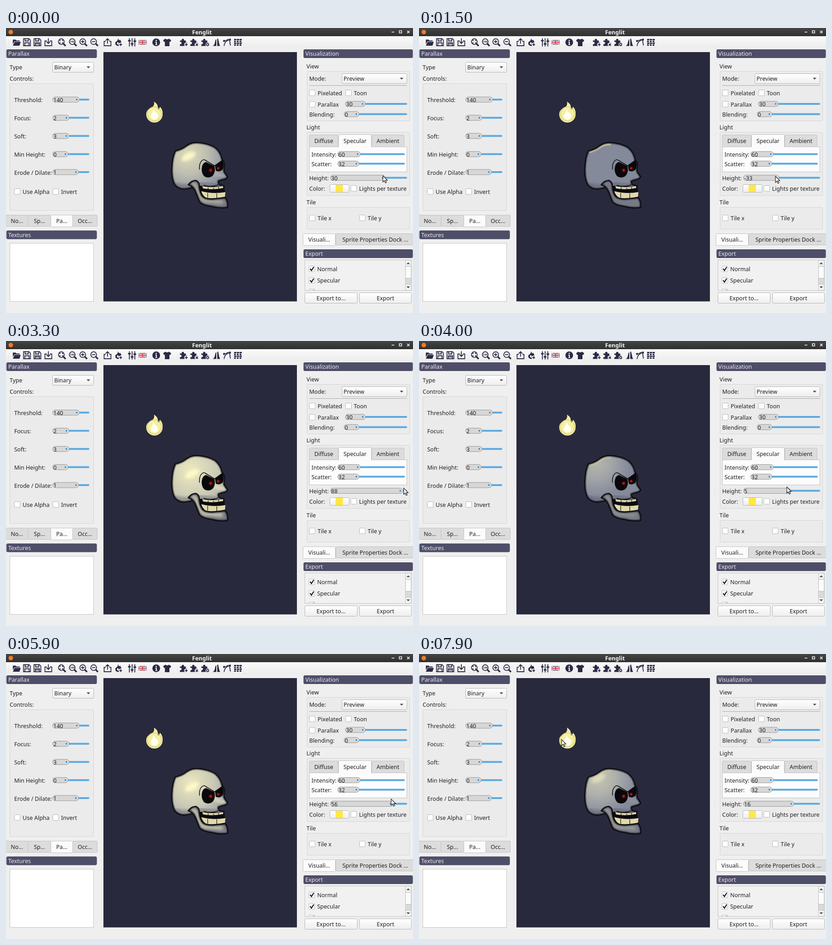
An HTML page that plays this animation: 894x627 px, repeating every 8 s.

```html
<!DOCTYPE html>
<html lang="en">
<head>
<meta charset="utf-8">
<title>Sprite lighting</title>
<style>
html, body { margin: 0; width: 100%; height: 100%; overflow: hidden; background: #efefef; }
svg { display: block; width: 894px; height: 627px; }
text { font: 12.5px "Noto Sans", sans-serif; fill: #1f1f22; white-space: pre; }
.head { fill: #ececf0; }
.mid { text-anchor: middle; }
.title { font-weight: 700; fill: #f4f4f4; text-anchor: middle; }
.solid { fill: #2b2a45; }
.line { fill: none; stroke: #2b2a45; stroke-width: 1.8; }
.ink { fill: none; stroke: #0b0a10; stroke-linejoin: round; stroke-linecap: round; }
</style>
</head>
<body>
<svg id="stage" viewBox="0 0 894 627" xmlns="http://www.w3.org/2000/svg"></svg>
<script>
const stage = document.getElementById('stage');
const clamp = (v, lo, hi) => Math.min(hi, Math.max(lo, v));

// ---- widget helpers ----
const rect = (x, y, w, h, fill, stroke = 'none', r = 0, more = '') =>
  `<rect x="${x}" y="${y}" width="${w}" height="${h}" fill="${fill}" stroke="${stroke}" rx="${r}" ${more}/>`;
const path = (d, more = '') => `<path d="${d}" ${more}/>`;
const text = (x, y, s, cls = '', more = '') => `<text x="${x}" y="${y}" class="${cls}" ${more}>${s}</text>`;
const header = (x, y, w, s) => rect(x, y, w, 18, '#4f4e69', '#45445d', 2) + text(x + 3.5, y + 13.5, s, 'head');
const group = (x, y, w, h) => rect(x, y, w, h, '#ebebeb', '#d4d4d4', 1);
const arrow = (x, y, up) => path(up ? `M${x - 4} ${y + 2}h8l-4 -4z` : `M${x - 4} ${y - 2}h8l-4 4z`, 'fill="#4a4a4a"');
const combo = (x, y, w, h, s) => rect(x, y, w, h, 'url(#btn)', '#b5b5b5', 2) +
  text(x + 3.5, y + 15.8, s) + arrow(x + w - 11.5, y + h / 2);
const button = (x, y, w, h, s) => rect(x, y, w, h, 'url(#btn)', '#b5b5b5', 2) + text(x + w / 2, y + 16, s, 'mid');
const check = (x, y, s, on) => rect(x, y, 12.5, 12.5, '#fff', '#b8b8b8', 1) +
  (on ? path(`M${x + 2.5} ${y + 6}l3 4 5 -8`, 'fill="none" stroke="#111" stroke-width="2.2"') : '') +
  text(x + 18, y + 11, s);
const slider = (x, end, right, y, value, id = '') =>
  rect(x + 4, y - 2, right - x - 4, 4, '#5aa9e0', 'none', 2) +
  rect(x + .5, y - 5.8, end - x, 11.6, '#d7d7d7', '#969696', 5.8, id && `id="${id}Pill"`) +
  rect(end - 7, y - 1.5, 3, 3, '#2f83c4', 'none', 0, id && `id="${id}Dot"`) +
  text(x + 2, y + 5.2, value, '', id && `id="${id}Text"`);
const tab = (x, y, w, h, s, on) => rect(x, y, w, h, on ? '#fbfbfb' : '#dcdcdc', '#c2c2c2', 1) +
  text(x + w / 2, y + h / 2 + 4.6, s, 'mid');
const dots = (x, y) => [0, 4, 8].map(d => rect(x, y + d, 1, 1, '#bbb')).join('');

// ---- toolbar ----
const icon = (x, body) => `<g transform="translate(${x - 9} 22.5)">${body}</g>`;
const solid = d => path(d, 'class="solid"');
const line = d => path(d, 'class="line"');
const lens = inner => `<circle cx="7.5" cy="7.5" r="6.3" class="line"/>` +
  path('M12 12l5 5', 'class="line" style="stroke-width:3.4"') + inner;
const disk = line('M1.5 1h12l3 3v12.5h-15z M5 1v5h7V1 M4.5 16.5V10h9v6.5');
const puzzle = solid('M0 5h4a2.7 2.7 0 1 1 5 0h4v4a2.7 2.7 0 1 1 0 5v3H0v-4a2.7 2.7 0 1 0 0 -5z');
const badge = d => `<circle cx="14" cy="14" r="4.6" fill="#f3f3f3"/>` + line(d);
const flag = rect(0, 4, 18, 10, '#31417c') +
  path('M0 4l18 10M18 4L0 14', 'stroke="#fff" stroke-width="2.4"') +
  path('M0 4l18 10M18 4L0 14', 'stroke="#d13b48" stroke-width=".8"') +
  path('M9 4v10M0 9h18', 'stroke="#fff" stroke-width="4"') +
  path('M9 4v10M0 9h18', 'stroke="#d1303f" stroke-width="2.2"');
const bricks = [0, 1, 2, 3].map(r => [0, 6, 12].map(c =>
  rect(c + 1, r * 4 + 1.5, r % 2 ? 4 : 5, 3, '#2b2a45')).join('')).join('');

const toolbar = [
  [23, solid('M1 3h6l2 2h7v2H4.5L1 13z M5 8h13.5l-3 8.5H1z')],
  [46, disk],
  [69, disk + solid('M5 12h8v1.5H5z')],
  [93, line('M5.5 6H1.5v10.5h15V6h-4 M9 0v11 M5 7.5l4 4 4 -4')],
  [123, lens(line('M4.5 6V4.500H6M9 4.500h1.500V6M10.500 9v1.500H9M6 10.500H4.500V9'))],
  [147, lens(text(7.5, 9.8, '100', 'mid', 'style="font-size:5.500px;font-weight:700"'))],
  [170, lens(line('M7.500 4v7M4 7.500h7'))],
  [194, lens(line('M4 7.500h7'))],
  [223, line('M5 7H1.500v9.500h15V7H13 M9 12V1 M5 5l4 -4 4 4')],
  [247, solid('M8 0Q9 3 11 5 12 4 12 3 16 7 15 11 13 17 8 17 2 16 2 11 2 8 6 6 8 4 8 0z') +
    path('M7 8Q11 10 9 14 6 14 5.500 11.500z', 'fill="#f3f3f3"') + badge('M14 11v6M11 14h6')],
  [277, line('M3 0v18M9 0v18M15 0v18') + solid('M0 4h6v3H0zM6 11h6v3H6zM12 5h6v3h-6z')],
  [300, flag],
  [330, `<circle cx="9" cy="9" r="8.500" class="solid"/>` + path('M7 7.500h3.200v6h1.300v1.300H6.800v-1.300H8V9H7z M7.700 3.500h2.600v2.500H7.700z', 'fill="#f4f4f4"')],
  [354, solid('M5 1Q9 4 13 1l5 3.500 -2.500 4L14 7.500V17.500H4V7.500l-1.500 1L0 4.500z')],
  [391, puzzle + badge('M14 11v6M11 14h6')],
  [414, puzzle + badge('M12 12l4.500 4.500M16.500 12l-4.500 4.500')],
  [438, puzzle + badge('M14 11.500a2.500 2.500 0 1 1 -.1 0')],
  [462, solid('M1 17Q5 15 6 9 7 3 9 2V17z M11 1h2l3 14h1v2h-6z')],
  [486, line('M2 17Q3 6 15 3') + solid('M0 4h4v4H0zM13 1h4v4h-4z') + line('M4 6L12 2M14 4l2 12')],
  [509, bricks]
].map(([x, body]) => icon(x, body)).join('');

// ---- sprite shapes ----
const cranium = 'M372 270Q386 267 396 259Q408 250 424 252Q446 254 460 263Q472 273 475 289Q481 296 480 305' +
  'Q478 313 480 317L487 327Q486 333 476 334L467 337Q466 343 471 345L479 347L478 354Q455 359 432 354L424 351' +
  'Q414 349 403 353Q383 358 372 347Q363 335 364 308Q365 283 372 270Z';
const jaw = 'M400 345Q407 335 417 335Q425 338 425 348Q426 362 432 370Q438 376 453 376L482 373Q489 383 487 395' +
  'Q470 398 452 393Q429 390 424 381Q420 370 415 358Q410 348 400 345Z';

const skull = `
<g clip-path="url(#inCranium)">
  ${path(cranium, 'fill="#858a9b"')}
  ${path(cranium, 'fill="url(#glow)" id="wash"')}
  <g id="hot"><ellipse rx="17" ry="7.5" fill="#fffbc8" transform="rotate(-28)" filter="url(#soft)"/></g>
  ${path('M374 273Q387 270 398 262Q408 255 421 256', 'id="rim" fill="none" stroke="#f3e9a4" stroke-width="3.2" filter="url(#fine)"')}
  ${path('M457 318Q469 327 483 324', 'id="nose" fill="none" stroke="#e8e4c0" stroke-width="7" filter="url(#soft)"')}
  ${path('M372 343Q390 354 424 343L480 350', 'fill="none" stroke="#4d5160" stroke-opacity=".45" stroke-width="9" filter="url(#soft)"')}
  ${path(cranium, 'fill="none" stroke="#15151d" stroke-opacity=".85" stroke-width="5" filter="url(#fine)"')}
</g>
${path(cranium, 'class="ink" stroke-width="2.2"')}
${path('M425 347L479 349L482 366L440 374Q429 370 425 352Z', 'fill="#0b0a10"')}
${path('M431 348Q454 352 477 348L477 352Q455 357 433 353Z', 'fill="#dcd4a8"')}
${path('M429 359Q455 366 482 361L481 371Q459 376 440 374Q431 368 429 359Z', 'fill="#e2d9aa"')}
${path('M444 351v4M456 352v4M467 350v4M443 363v10M463 364v10', 'class="ink" stroke-width="1.2"')}
<g clip-path="url(#inJaw)">
  ${path(jaw, 'fill="#777a85"')}
  ${path('M408 341Q418 344 420 356Q424 372 434 380L476 383', 'id="jawLight" fill="none" stroke="#dcd8b2" stroke-width="7" filter="url(#soft)"')}
  ${path(jaw, 'fill="none" stroke="#15151d" stroke-opacity=".8" stroke-width="5" filter="url(#fine)"')}
</g>
${path(jaw, 'class="ink" stroke-width="2.2"')}
${path('M431 303Q434 295 440 295L458 304Q461 318 453 326Q444 332 435 326Q427 316 431 303Z', 'fill="#09080c"')}
${path('M459 303L475 291Q481 301 476 311Q469 318 461 314Z', 'fill="#09080c"')}
${path('M425 311Q424 298 430 292Q434 288 438 291L458 303L475 291', 'class="ink" stroke-width="1.5"')}
${path('M435 346Q448 351 466 345', 'class="ink" stroke-width="1.6"')}
<circle cx="449.500" cy="313" r="6" fill="url(#ember)"/>
<circle cx="466" cy="308.500" r="5" fill="url(#ember)"/>`;

const flame = path('M325 162C338 170 331 177 335 179Q338 177 338 173Q345 180 344 190A18 18 0 0 1 308 190C308 180 315 178 321 174Q327 170 325 162Z', 'fill="#f4efa3"') +
  `<circle cx="326" cy="189" r="15.500" fill="none" stroke="#d8ce78" stroke-width="1.5"/>` +
  path('M324 178Q327 185 331 187Q336 192 333 198Q329 203 323 201Q317 198 318 191Q322 188 324 178Z', 'fill="#fffef0"');

const defs = `<defs>
<linearGradient id="btn" x2="0" y2="1"><stop stop-color="#fff"/><stop offset="1" stop-color="#eee"/></linearGradient>
<linearGradient id="bar" x2="0" y2="1"><stop stop-color="#454545"/><stop offset="1" stop-color="#303030"/></linearGradient>
<linearGradient id="tools" x2="0" y2="1"><stop stop-color="#fafafa"/><stop offset="1" stop-color="#ececec"/></linearGradient>
<radialGradient id="glow" gradientUnits="userSpaceOnUse" cx="390" cy="270" r="90">
  <stop stop-color="#eeeac0"/><stop offset=".45" stop-color="#d0cfb8" stop-opacity=".9"/><stop offset="1" stop-color="#c4c5b8" stop-opacity="0"/></radialGradient>
<radialGradient id="ember"><stop stop-color="#e0302a"/><stop offset=".35" stop-color="#901510"/><stop offset="1" stop-color="#300" stop-opacity="0"/></radialGradient>
<filter id="soft" x="-50%" y="-50%" width="200%" height="200%"><feGaussianBlur stdDeviation="3"/></filter>
<filter id="fine" x="-20%" y="-50%" width="140%" height="200%"><feGaussianBlur stdDeviation="1.3"/></filter>
<clipPath id="inCranium">${path(cranium)}</clipPath>
<clipPath id="inJaw">${path(jaw)}</clipPath>
<clipPath id="list"><rect x="656" y="511" width="220" height="66"/></clipPath>
</defs>`;

const leftDock = header(1.5, 47.5, 197.5, 'Parallax') + text(8, 91, 'Type') + combo(102.5, 75.5, 90, 22, 'Binary') +
  text(8, 116, 'Controls:') + group(8.5, 122.5, 184, 279) +
  [['Threshold:', 140, 161, 158], ['Focus:', 2, 138, 198], ['Soft:', 3, 138, 238],
   ['Min Height:', 0, 136, 278], ['Erode / Dilate:', 1, 159, 317.5]]
    .map(([s, v, end, y]) => text(18, y + 5, s) + slider(102, end, 183, y - .5, v)).join('') +
  check(18.5, 353.5, 'Use Alpha') + check(103, 353.5, 'Invert') +
  tab(-.5, 411.5, 49, 25, 'No...') + tab(48.5, 411.5, 50, 25, 'Sp...') +
  tab(146.5, 411.5, 54, 25, 'Occ...') + tab(98.5, 411.5, 48, 26, 'Pa...', true) +
  header(1.5, 446, 197.5, 'Textures') + rect(8.5, 473.5, 184, 128, '#fff', '#c3c3c3');

const rightDock = header(654, 47.5, 239, 'Visualization') + text(660, 89, 'View') + group(661.5, 95.5, 225, 109) +
  text(666, 116, 'Mode:') + combo(738, 100.5, 142.5, 22, 'Preview') + rect(666, 126, 215, 1, '#a9a9a9') +
  check(666.5, 136.5, 'Pixelated') + check(746, 136.5, 'Toon') + check(666.5, 161.5, 'Parallax') +
  slider(745, 789, 881, 167, 30) + text(666, 195, 'Blending:') + slider(742, 775, 881, 189.5, 0) +
  text(660, 223, 'Light') + group(661.5, 229.5, 225, 139) +
  tab(666.5, 235.5, 63, 26, 'Diffuse') + tab(803.5, 235.5, 71, 26, 'Ambient') +
  rect(666.5, 261.5, 214, 55, '#fcfcfc', '#c2c2c2') + tab(730.5, 234.5, 72, 27, 'Specular', true) +
  rect(731, 260, 71, 3, '#fbfbfb') +
  text(671, 283, 'Intensity:') + slider(728, 778, 876, 277.5, 60) +
  text(671, 304, 'Scatter:') + slider(728, 775, 876, 298.5, 32) +
  text(666, 335, 'Height:') + slider(712, 833, 881, 329.5, 30, 'h') +
  text(666, 358, 'Color:') + rect(711.5, 344.5, 42, 17, 'url(#btn)', '#b5b5b5', 2) + rect(724, 345, 16, 16, '#ffe845') +
  check(757.5, 346.5, 'Lights per texture') +
  text(660, 388, 'Tile') + group(661.5, 394.5, 225, 48) + check(666.5, 411.5, 'Tile x') + check(776.5, 411.5, 'Tile y') +
  tab(724.5, 452.5, 172, 25, '') + text(739, 470, 'Sprite Properties Dock ...') + tab(652.5, 452.5, 71, 26, 'Visuali...', true) +
  header(654, 487.5, 239, 'Export') + rect(656.5, 510.5, 234, 67, '#f1f1f1', '#c3c3c3') +
  `<g clip-path="url(#list)">${check(665.5, 523.5, 'Normal', true) + check(665.5, 549, 'Specular', true) + check(665.5, 574.5, '', true)}</g>` +
  rect(877.5, 511, 12.5, 66, '#dadada', '#c3c3c3') + rect(877.5, 524.5, 12.5, 26, '#fbfbfb', '#bbb') +
  rect(877.5, 511, 12.5, 13, '#f6f6f6', '#c3c3c3') + rect(877.5, 564, 12.5, 13, '#f6f6f6', '#c3c3c3') +
  arrow(883.5, 517.5, true) + arrow(883.5, 570.5) +
  button(656.5, 582.5, 115, 23, 'Export to...') + button(776.5, 582.5, 114, 23, 'Export');

stage.innerHTML = defs + rect(0, 0, 894, 627, '#efefef') +
  rect(0, 0, 894, 18, 'url(#bar)') + rect(0, 18, 894, 27, 'url(#tools)') +
  `<circle cx="10.500" cy="9" r="5" fill="#f57c22"/>` + text(430.5, 13.5, 'Fenglit', 'title') +
  path('M847 9h6M864 6h5v5h-5zM881 6l5.500 5.500M886.500 6l-5.500 5.500', 'fill="none" stroke="#f2f2f2" stroke-width="1.6"') +
  dots(6, 27) + dots(376, 27) + toolbar + leftDock + rightDock + dots(204, 325) + dots(649, 325) +
  rect(214, 53, 425, 548.5, '#29293d') + flame + skull +
  path('M0 0V13.800L3.200 10.800L5.400 15.800L7.700 14.800L5.500 10H9.800Z', 'id="cursor" fill="#fff" stroke="#111" stroke-width="1.1"');

// ---- motion: time, height value, pointer x, pointer y ----
const keys = [
  [0, 30, 828, 325], [600, 30, 828, 325], [1500, -33, 783, 326], [1800, -33, 783, 326],
  [2400, 36, 830, 324], [2600, 36, 830, 324], [3100, 100, 883, 324], [3200, 100, 883, 324],
  [4000, 5, 808, 321], [4100, -10, 798, 321], [4600, -45, 775, 321], [4800, -45, 775, 321],
  [4900, -38, 780, 321], [5700, 30, 828, 320], [5900, 56, 846, 319], [6300, 80, 863, 319],
  [6400, 80, 863, 319], [6900, 16, 816, 315], [7100, 16, 816, 315], [7300, 720 / 45, 720, 290],
  [7600, 16, 340, 238], [7700, 16, 287, 214], [7900, 16, 313, 188], [8000, 16, 313, 188]
];
function pose(t) {
  const i = keys.findIndex(k => k[0] > t);
  const a = keys[i - 1], b = keys[i], f = (t - a[0]) / (b[0] - a[0]);
  return a.map((v, n) => v + (b[n] - v) * f);
}

const $ = id => document.getElementById(id);
const set = (id, attrs) => { for (const k in attrs) $(id).setAttribute(k, attrs[k]); };

function render(t) {
  const [, v, x, y] = pose(Math.floor(t / 100) * 100);
  const end = 812.5 + .67 * v;
  set('hPill', { width: end - 712 });
  set('hDot', { x: end - 7 });
  $('hText').textContent = Math.round(v);
  set('cursor', { transform: `translate(${x} ${y})` });

  const near = clamp(v, 0, 45);
  set('glow', { cx: 386 + near * .45, cy: 264 + near * .5, r: 72 + clamp(v, -20, 100) * .75 });
  set('wash', { opacity: clamp((v + 25) / 65, 0, 1) });
  set('hot', { transform: `translate(${386 + near * .5} ${263 + near * .65})`, opacity: clamp((v - 4) / 28, 0, .9) });
  set('rim', { opacity: clamp(.9 - (v + 20) / 70, .25, .9) });
  set('nose', { opacity: clamp((v - 10) / 60, 0, .8) });
  set('jawLight', { opacity: clamp((v + 15) / 75, 0, .9) });
}

function tick() {
  render(performance.now() % 8000);
  requestAnimationFrame(tick);
}
tick();
</script>
</body>
</html>
```
